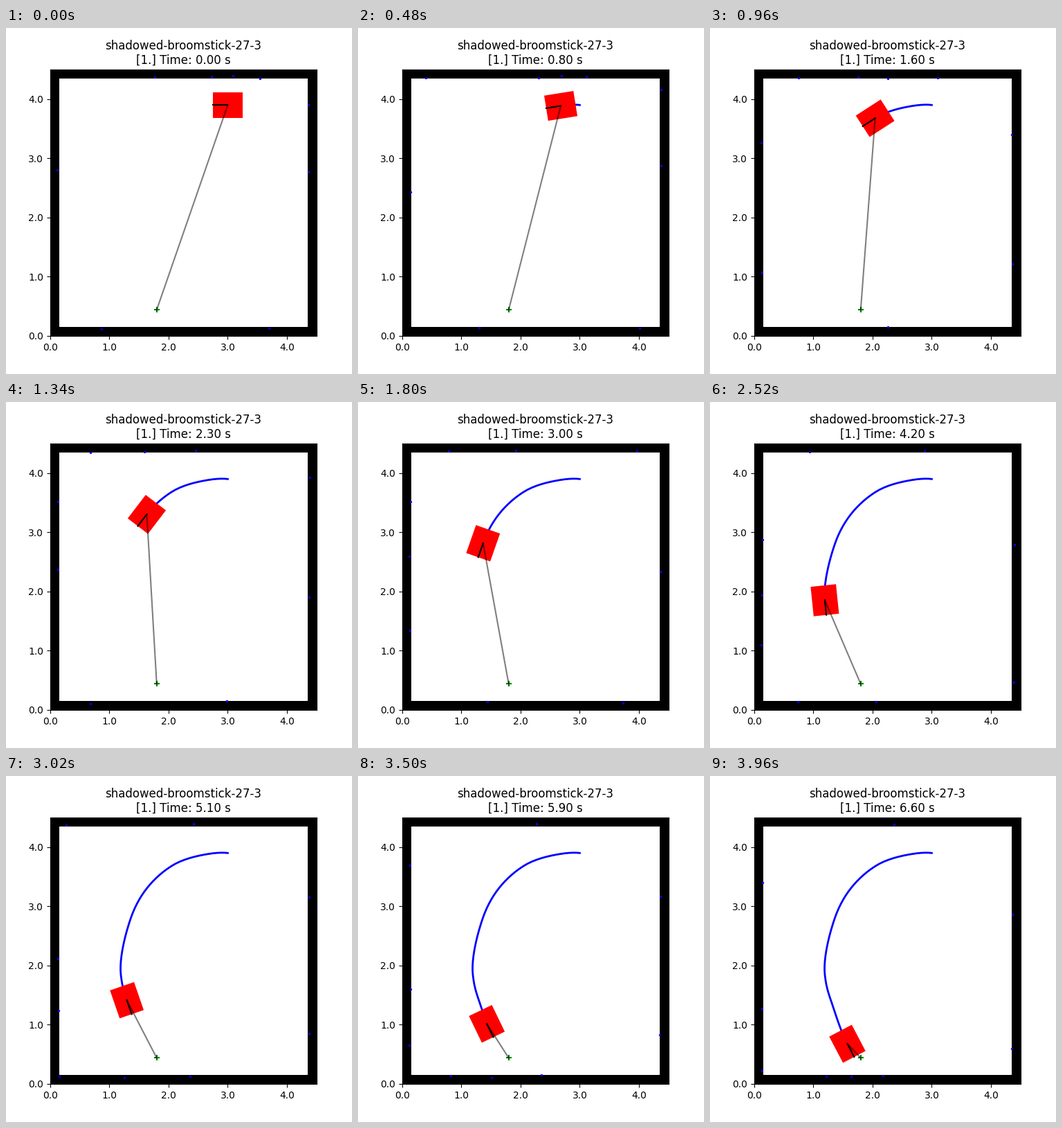
A matplotlib script that plays this animation: 500x500 px, repeating every 4060 ms.

```python
import numpy as np
import matplotlib.pyplot as plt
from matplotlib.animation import FuncAnimation
from matplotlib.patches import Polygon, Rectangle

SIZE, WALL = 4.5, 0.15
GOAL = np.array([1.8, 0.44])
LENGTH, WIDTH = 0.5, 0.43
STEPS, DT = 67, 0.1
END = (STEPS - 1) * DT
RAY_STEP = 5 / 99
RAYS = np.pi + np.radians(39.8) * np.arange(-4, 5)

# points the robot passes: time, x, y
WAYPOINTS = np.array([
    (0.0, 3.00, 3.90),
    (0.8, 2.68, 3.886),
    (1.6, 2.044, 3.677),
    (3.0, 1.368, 2.815),
    (4.2, 1.194, 1.853),
    (5.1, 1.296, 1.414),
    (END, 1.575, 0.678),
])


def direction(angle):
    return np.stack([np.cos(angle), np.sin(angle)], axis=-1)


def heading_at(t):
    """Drive straight at first, then a left turn that eases out."""
    turn = np.clip((t - 0.5) / (END - 0.5), 0, 1)
    return np.pi + np.radians(117.7) * np.sin(np.pi / 2 * turn)


def speed_at(t):
    """Speed up, cruise, then slow down near the goal."""
    return np.minimum(t, np.clip(0.82 - 0.3 * (t - 3.6), 0.51, 0.82))


def position_at(t):
    """Hermite path through the waypoints."""
    times, points = WAYPOINTS[:, 0], WAYPOINTS[:, 1:]
    velocity = speed_at(times)[:, None] * direction(heading_at(times))
    i = np.clip(np.searchsorted(times, t, side="right") - 1, 0, len(times) - 2)
    span = (times[i + 1] - times[i])[:, None]
    u = (t - times[i])[:, None] / span
    ease = u**2 * (3 - 2 * u)
    return (points[i] + ease * (points[i + 1] - points[i])
            + span * u * (1 - u)**2 * velocity[i]
            - span * u**2 * (1 - u) * velocity[i + 1])


def scan(pos, heading):
    """March each ray in fixed steps until it is inside a wall."""
    rays = direction(heading + RAYS)
    rays = np.where(np.abs(rays) < 1e-9, 1e-9, rays)
    edge = np.where(rays > 0, SIZE - WALL, WALL)
    reach = ((edge - pos) / rays).min(axis=1)
    return pos + np.ceil(reach / RAY_STEP)[:, None] * RAY_STEP * rays


def body(pos, heading):
    ahead = direction(heading) * LENGTH / 2
    side = direction(heading + np.pi / 2) * WIDTH / 2
    return [pos + ahead + side, pos + ahead - side,
            pos - ahead - side, pos - ahead + side]


clock = np.arange(STEPS) * DT
path, headings = position_at(clock), heading_at(clock)

fig, ax = plt.subplots(figsize=(5, 5), dpi=100)
ax.set_xlim(0, SIZE)
ax.set_ylim(0, SIZE)
ax.set_aspect("equal")
ticks = np.arange(5)
labels = [f"{v:.1f}" for v in ticks]
ax.set_xticks(ticks, labels)
ax.set_yticks(ticks, labels)

room = SIZE - 2 * WALL
ax.add_patch(Rectangle((0, 0), SIZE, SIZE, fc="black", lw=0, zorder=0))
ax.add_patch(Rectangle((WALL, WALL), room, room, fc="white", lw=0, zorder=0.1))

trail, = ax.plot([], [], color="blue", lw=2, zorder=1)
robot = ax.add_patch(Polygon(body(path[0], headings[0]), fc="red", lw=0,
                             zorder=2))
ax.scatter(*GOAL, marker="+", color="green", zorder=3)
to_goal, = ax.plot([], [], color="black", alpha=0.5, lw=1.5, zorder=4)
nose, = ax.plot([], [], color="black", lw=1.5, zorder=5)
hits = ax.scatter([], [], s=2, color="blue", zorder=6)
title = ax.set_title("")


def update(frame):
    # steps alternate between 20 ms and 100 ms
    k = min(2 * (frame // 6) + (frame % 6 > 0), STEPS - 1)
    pos, heading = path[k], headings[k]
    title.set_text(f"shadowed-broomstick-27-3\n[1.] Time: {k * DT:.2f} s")
    trail.set_data(*path[:k + 1].T)
    robot.set_xy(body(pos, heading))
    to_goal.set_data(*np.array([pos, GOAL]).T)
    nose.set_data(*np.array([pos, pos + direction(heading) * LENGTH / 2]).T)
    hits.set_offsets(scan(pos, heading))
    return trail, robot, to_goal, nose, hits, title


anim = FuncAnimation(fig, update, frames=203, interval=20, repeat=True,
                     repeat_delay=0, blit=False)
plt.show()
```
